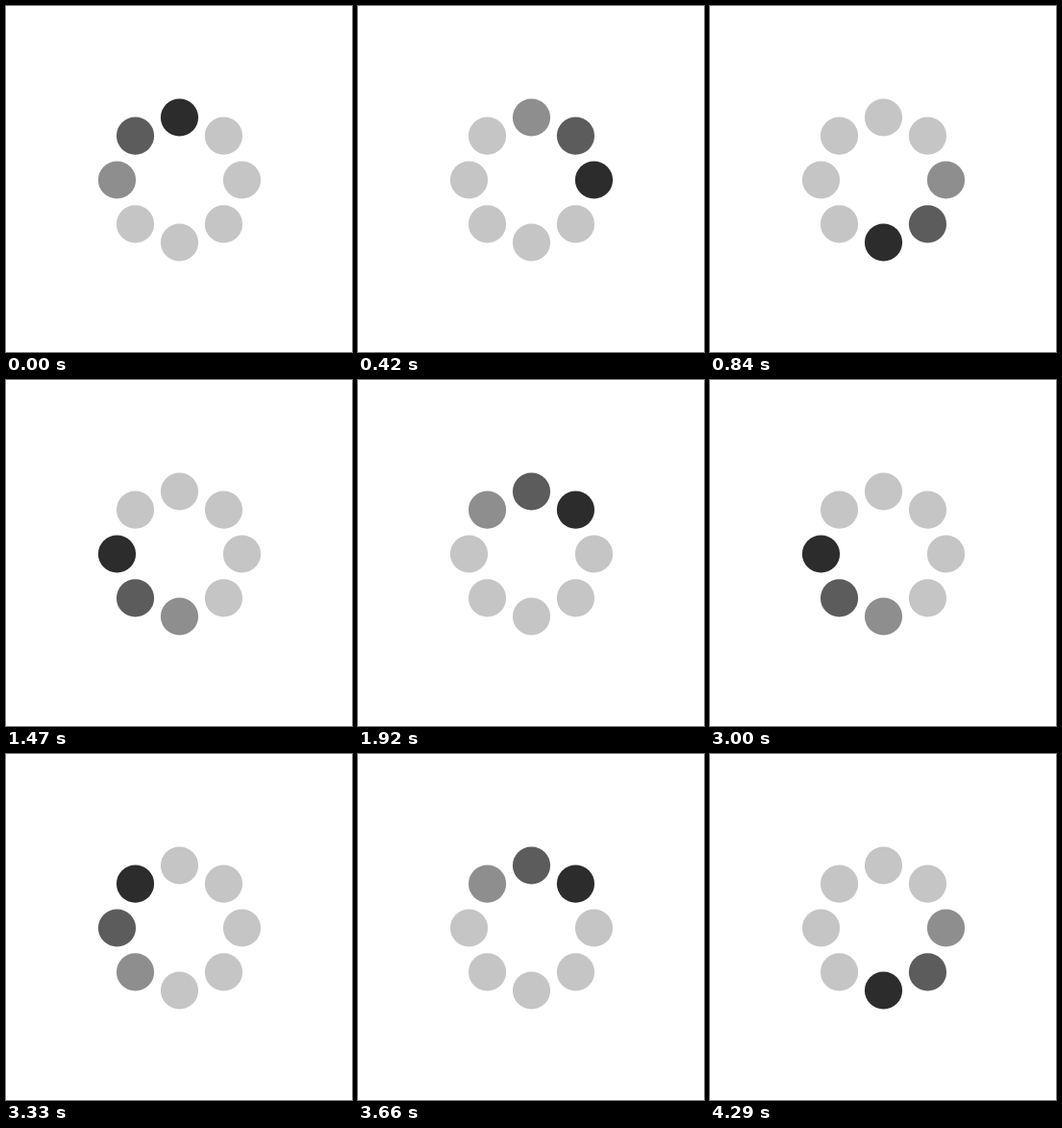
An HTML page for the animation above (4.5 s loop, 360 by 360 pixels).

```html
<!DOCTYPE html>
<html lang="en">
<head>
<meta charset="utf-8">
<title>Loading spinner</title>
<style>
  html, body { margin: 0; width: 100%; height: 100%; overflow: hidden; background: #fff; }
  svg { display: block; width: 100%; height: 100%; }
</style>
</head>
<body>
<svg viewBox="0 0 360 360"></svg>
<script>
const LOOP = 4500, STEP = 210, DOTS = 8;
const PAUSE = 30, PAUSE_STARTS = [1470, 2550, 3210];
const TRAIL = ['#2c2c2c', '#5c5c5c', '#8e8e8e'], IDLE = '#c5c5c5';
const CENTER_X = 180.5, CENTER_Y = 181, RING = 65, RADIUS = 19.6;

const svg = document.querySelector('svg');
const dots = Array.from({ length: DOTS }, (_, i) => {
  const angle = i * 2 * Math.PI / DOTS;
  const dot = document.createElementNS(svg.namespaceURI, 'circle');
  dot.setAttribute('cx', CENTER_X + RING * Math.sin(angle));
  dot.setAttribute('cy', CENTER_Y - RING * Math.cos(angle));
  dot.setAttribute('r', RADIUS);
  return svg.appendChild(dot);
});

// Steps are even, apart from three short holds per loop.
function headAt(time) {
  const held = PAUSE * PAUSE_STARTS.filter(start => time >= start).length;
  return Math.floor((time - held) / STEP);
}

function draw(time) {
  const head = headAt(time) % DOTS;
  dots.forEach((dot, i) => {
    const age = (head - i + DOTS) % DOTS;
    dot.setAttribute('fill', TRAIL[age] || IDLE);
  });
}

const begin = performance.now();
function tick() {
  draw((performance.now() - begin) % LOOP);
  requestAnimationFrame(tick);
}
tick();
</script>
</body>
</html>
```
